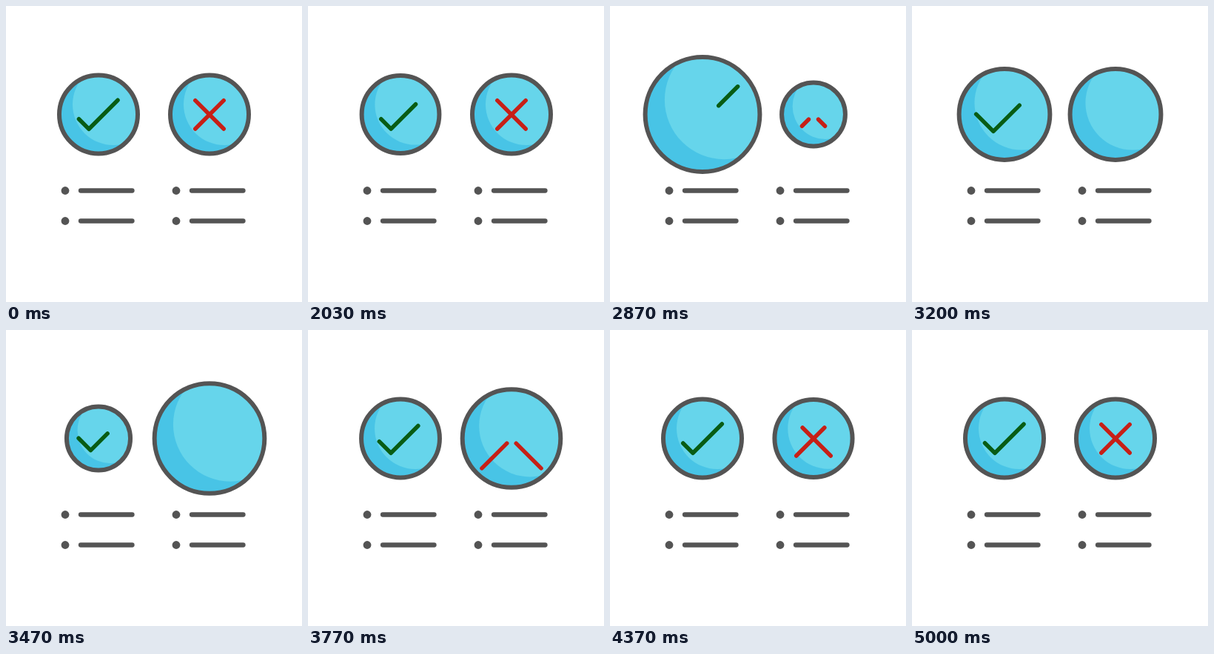
An HTML page with a canvas that plays this animation: 400 by 400 pixels, repeating every 5.12 s.

```html
<!DOCTYPE html>
<html>
<head>
<meta charset="utf-8">
<style>
  html, body { margin: 0; width: 100%; height: 100%; overflow: hidden; background: #fff; }
  canvas { display: block; width: 400px; height: 400px; }
</style>
</head>
<body>
<canvas id="stage" width="400" height="400"></canvas>
<script>
const ctx = document.getElementById('stage').getContext('2d');
const LOOP = 5120, START = 2030, STEP = 30, END = 5000;
const GREY = '#545454', LIGHT = '#66d5eb', DARK = '#48c4e6', GREEN = '#085c14', RED = '#c71f16';
const CY = 146.5, REST = 56, LINE = 6;

// Tables of [time, value], eased with a half cosine between entries.
const checkDisc = [[2000, REST], [2190, 46], [2890, 80.5], [2970, 80.5], [3450, 46], [3965, 60.5], [4370, REST]];
const crossDisc = [[2530, REST], [2820, 45.5], [3500, 77.5], [3610, 77.5], [4080, 46], [4560, 60.5], [4960, REST]];
const checkSlide = [[2656, 1], [3305, -0.1], [3940, 0.1], [4400, 0.104], [4960, 0.1]];
const crossSlide = [[3500, 1], [4070, 0.08], [4400, 0.27], [4850, 0.2]];

const checkPath = [[-33.1, -0.3], [-13, 19.8], [32.6, -25.8]];
const crossPaths = [[[-32, -31.7], [32, 32.3]], [[32, -31.7], [-32, 32.3]]];

function track(table, t) {
  if (t <= table[0][0]) return table[0][1];
  for (let i = 1; i < table.length; i++) {
    const [t0, v0] = table[i - 1], [t1, v1] = table[i];
    if (t < t1) return v0 + (v1 - v0) * (1 - Math.cos(Math.PI * (t - t0) / (t1 - t0))) / 2;
  }
  return table[table.length - 1][1];
}

const progress = (t, from, to) => Math.min(1, Math.max(0, (t - from) / (to - from)));

// Visible part of each mark, as fractions of its extended path.
function checkSpan(t) {
  if (t < 2300) return [0.1, 0.9 - 0.8 * progress(t, 2000, 2300)];
  const p = track(checkSlide, t);
  return [p, p + 0.8];
}

function crossSpan(t) {
  if (t < 2980) return [0.2 + 0.6 * progress(t, 2600, 2980), 0.8];
  const p = track(crossSlide, t);
  return [p, p + 0.6];
}

function circle(x, y, r) {
  ctx.beginPath();
  ctx.arc(x, y, r, 0, 2 * Math.PI);
}

function disc(cx, outer) {
  const r = outer - LINE / 2, s = r / 53;
  ctx.save();
  circle(cx, CY, r);
  ctx.fillStyle = DARK;
  ctx.fill();
  ctx.clip();
  circle(cx + 20 * s, CY - 13.5 * s, 55 * s);
  ctx.fillStyle = LIGHT;
  ctx.fill();
  ctx.restore();
  circle(cx, CY, r);
  ctx.lineWidth = LINE;
  ctx.strokeStyle = GREY;
  ctx.stroke();
  return s;
}

function mark(path, cx, s, span, color) {
  const a = Math.max(0, span[0]), b = Math.min(1, span[1]);
  if (b - a < 0.005) return;
  const pts = path.map(([x, y]) => [cx + x * s, CY + y * s]);
  let len = 0;
  ctx.beginPath();
  pts.forEach(([x, y], i) => {
    if (i) len += Math.hypot(x - pts[i - 1][0], y - pts[i - 1][1]);
    ctx.lineTo(x, y);
  });
  ctx.setLineDash([(b - a) * len, 2 * len]);
  ctx.lineDashOffset = -a * len;
  ctx.lineWidth = 5.5;
  ctx.strokeStyle = color;
  ctx.stroke();
  ctx.setLineDash([]);
}

function list(x) {
  for (const y of [249.5, 290.5]) {
    circle(x, y, 5.4);
    ctx.fillStyle = GREY;
    ctx.fill();
    ctx.beginPath();
    ctx.moveTo(x + 21, y);
    ctx.lineTo(x + 90.5, y);
    ctx.lineWidth = 6.3;
    ctx.strokeStyle = GREY;
    ctx.stroke();
  }
}

function draw(t) {
  ctx.fillStyle = '#fff';
  ctx.fillRect(0, 0, 400, 400);
  ctx.lineCap = ctx.lineJoin = 'round';
  list(80);
  list(230);
  const s1 = disc(125, track(checkDisc, t));
  mark(checkPath, 125, s1, checkSpan(t), GREEN);
  const s2 = disc(275, track(crossDisc, t));
  crossPaths.forEach(path => mark(path, 275, s2, crossSpan(t), RED));
}

const begin = performance.now();
function frame() {
  const t = (performance.now() - begin) % LOOP;
  const active = t >= START && t < END;
  draw(active ? START + Math.floor((t - START) / STEP) * STEP : 0);
  requestAnimationFrame(frame);
}
frame();
</script>
</body>
</html>
```
